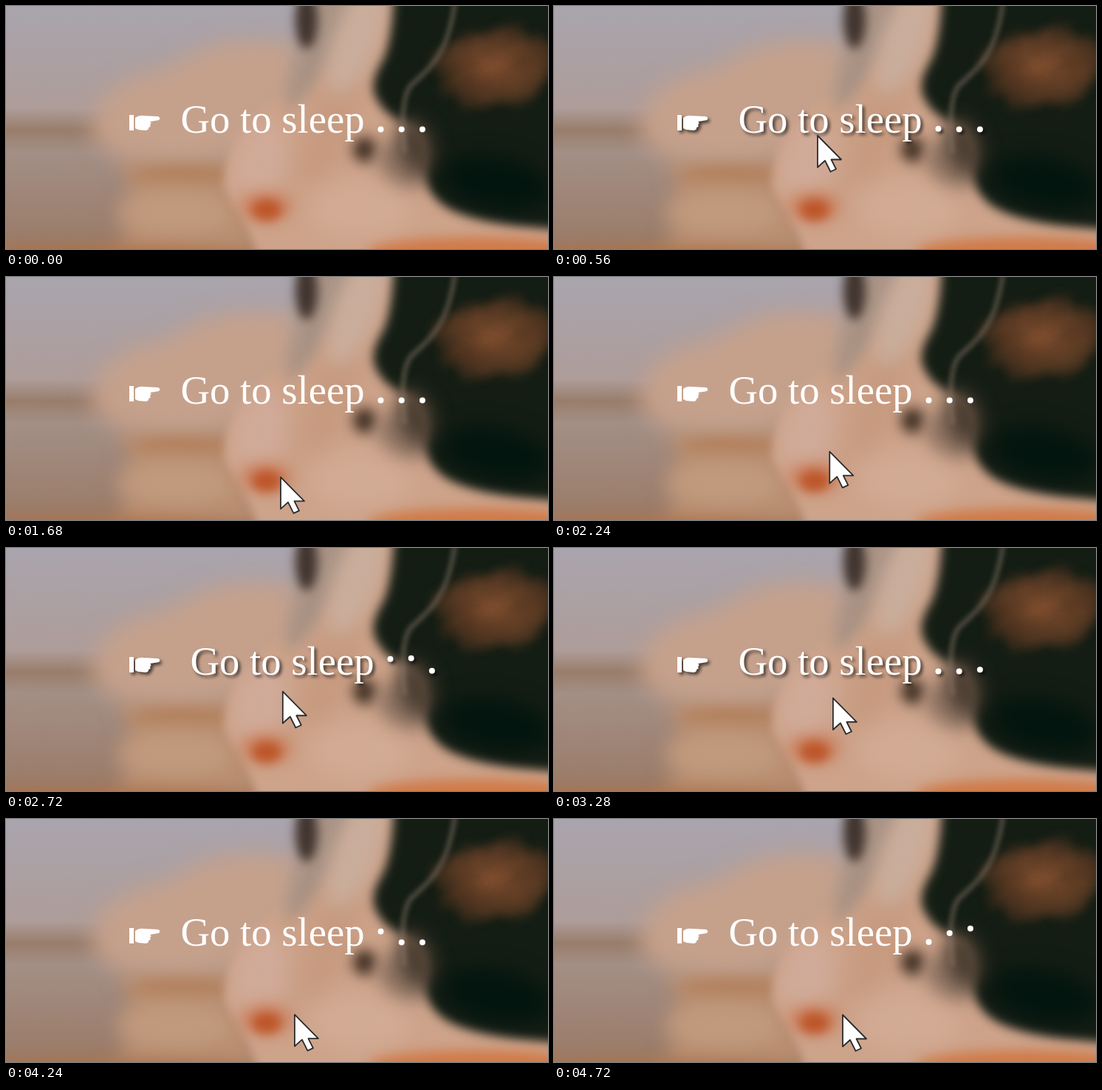
Write an HTML page with a canvas that moves like this. It is 734 px wide and 330 px high and loops after 4.8 s.

```html
<!DOCTYPE html>
<html lang="en">
<head>
<meta charset="utf-8">
<title>Go to sleep</title>
<style>
  html, body { margin: 0; width: 100%; height: 100%; overflow: hidden; background: #a99b9b; }
  canvas { display: block; }
</style>
</head>
<body>
<canvas id="stage" width="734" height="330"></canvas>
<script>
const W = 734, H = 330, LOOP = 4800, STEP = 80;
const ctx = document.getElementById('stage').getContext('2d');
const backdrop = document.createElement('canvas');
backdrop.width = W;
backdrop.height = H;
const bg = backdrop.getContext('2d');

const clamp = v => Math.max(0, Math.min(1, v));
const mix = (a, b, k) => a + (b - a) * k;
const smooth = k => k * k * (3 - 2 * k);

let seed = 7;
const random = () => (seed = seed * 16807 % 2147483647) / 2147483647;

function soft(color, blur, path) {
  bg.filter = `blur(${blur}px)`;
  bg.fillStyle = color;
  bg.fill(new Path2D(path));
}

function oval(color, blur, x, y, rx, ry, turn = 0) {
  bg.filter = `blur(${blur}px)`;
  bg.fillStyle = color;
  bg.beginPath();
  bg.ellipse(x, y, rx, ry, turn, 0, Math.PI * 2);
  bg.fill();
}

// Soft tufts scattered inside an ellipse, strongest near its centre.
function fur(count, hue, light, x, y, rx, ry) {
  for (let i = 0; i < count; i++) {
    const angle = i * 2.4, reach = Math.sqrt(i / count);
    const l = light * (1 - 0.45 * reach) + 6 * random();
    oval(`hsla(${hue}, 45%, ${l}%, 0.5)`, 7,
      x + rx * reach * Math.cos(angle), y + ry * reach * Math.sin(angle),
      rx * 0.35, ry * 0.3, -0.4);
  }
}

function paintBackdrop() {
  const wall = bg.createLinearGradient(0, 0, 0, H);
  wall.addColorStop(0, '#a9a4ad');
  wall.addColorStop(0.42, '#ae9d9a');
  wall.addColorStop(0.51, '#997d6b');
  wall.addColorStop(0.6, '#a38f86');
  wall.addColorStop(1, '#9a7a66');
  bg.fillStyle = wall;
  bg.fillRect(0, 0, W, H);

  // paws and blanket
  soft('#b98f72', 14, 'M140 350Q190 270 150 205H340V350Z');
  soft('#c5a18c', 15, 'M115 165Q125 100 220 85Q290 30 400 55V170Q290 225 190 210Q120 205 115 165');
  oval('#b27e58', 10, 240, 228, 70, 10);
  oval('#c19a7e', 14, 230, 280, 80, 28);
  oval('#ab744f', 10, 130, 340, 230, 14);

  // face
  soft('#cda38a', 6, 'M385 110Q420 40 430 -30H560L760 260V360H345Q335 305 297 250Q290 180 385 110');
  soft('#a89284', 10, 'M375 140Q395 40 425 -20H480Q445 80 400 130Z');
  oval('#d0aa98', 12, 345, 210, 36, 55, 0.3);
  oval('#c69a7f', 16, 440, 165, 30, 90, 0.35);
  oval('#d2ab94', 16, 480, 275, 70, 40);
  oval('#c9ad9c', 12, 475, 40, 28, 85, 0.35);
  oval('#41342e', 7, 407, 18, 15, 40);

  // dark coat
  oval('#3c2c20', 9, 486, 195, 16, 17);
  oval('#8d7362', 12, 540, 215, 40, 28, 0.5);
  soft('#141d14', 7, `M526 -40Q525 50 508 78Q490 108 503 128Q515 150 542 160
    Q570 170 568 215Q565 250 592 270Q620 290 700 299L790 308V-40Z`);
  oval('#4a3d31', 12, 555, 190, 24, 40, -0.3);
  oval('#03150f', 14, 665, 240, 75, 36, 0.2);
  fur(28, 23, 40, 664, 82, 72, 46);
  oval('#d07a48', 8, 640, 334, 150, 20);

  // nose
  oval('#cb8260', 10, 352, 272, 36, 20);
  oval('#bd5529', 7, 353, 277, 20, 14);

  // whisker
  bg.filter = 'blur(3px)';
  bg.strokeStyle = '#8d7b6e88';
  bg.lineWidth = 6;
  bg.stroke(new Path2D('M608 -5C598 70 572 85 548 108Q532 130 540 200'));
  bg.filter = 'none';
}

// cubic-bezier(.25, .1, .25, 1)
function ease(x) {
  if (x <= 0 || x >= 1) return clamp(x);
  let lo = 0, hi = 1, s;
  for (let i = 0; i < 20; i++) {
    s = (lo + hi) / 2;
    if (0.75 * s * (1 - s) + s ** 3 < x) lo = s; else hi = s;
  }
  return 0.3 * s * (1 - s) ** 2 + 3 * s * s * (1 - s) + s ** 3;
}

const ramp = (t, start) => ease((t - start) / 240);
const visit = (t, enter, leave) => ramp(t, enter) - ramp(t, leave);
const hoverAt = t => visit(t, 300, 1240) + visit(t, 2400, 3800);

const WAVE = { start: 540, period: 1770, rise: 360, gap: 195, height: 20 };
function lift(t, index) {
  const sinceStart = t - WAVE.start - index * WAVE.gap;
  const u = (sinceStart + 2 * WAVE.period) % WAVE.period / WAVE.rise;
  return WAVE.height * (u < 1 ? ease(u) : 1 - ease(u - 1));
}

// The pointer comes in from below, then glides between a few stops.
const STOPS = [
  { t: 80, x: 352, y: 340 }, { t: 560, x: 357, y: 176 }, { t: 1700, x: 372, y: 272 },
  { t: 2900, x: 375, y: 190 }, { t: 4300, x: 391, y: 266 }
];
function pointerAt(t) {
  const next = STOPS.findIndex(stop => stop.t > t);
  if (next === 0) return STOPS[0];
  if (next < 0) return STOPS[STOPS.length - 1];
  const a = STOPS[next - 1], b = STOPS[next];
  const k = smooth((t - a.t) / (b.t - a.t));
  return { x: mix(a.x, b.x, k), y: mix(a.y, b.y, k) };
}

const HAND = new Path2D(`M167 148h6v21h-6z
  M175 152Q180 148 187 149L206 150Q210 152 207 155L195 157
  Q198 159 195 161Q197 164 193 165Q194 168 189 169L179 168L175 166Z`);
const ARROW = new Path2D('M0 0V43L10 34L17.5 49L25 45.5L18.5 32.5H32Z');

function drawLabel(t) {
  const hover = hoverAt(t), shift = 13 * hover;
  ctx.save();
  ctx.filter = 'blur(0.6px)';
  ctx.fillStyle = '#fff';
  ctx.shadowColor = `rgba(0, 0, 0, ${0.65 * hover})`;
  ctx.shadowBlur = 4;
  ctx.shadowOffsetX = ctx.shadowOffsetY = 3 * hover;
  ctx.fill(HAND);
  ctx.font = '54.7px "Liberation Serif", "Times New Roman", serif';
  ctx.fillText('Go to sleep', 236.6 + shift, 172.3);
  for (let i = 0; i < 3; i++) {
    ctx.beginPath();
    ctx.arc(507.5 + 28.2 * i + shift, 167.5 - lift(t, i), 4, 0, Math.PI * 2);
    ctx.fill();
  }
  ctx.restore();
}

function drawPointer(t) {
  const { x, y } = pointerAt(t);
  ctx.save();
  ctx.translate(x, y);
  ctx.lineJoin = 'round';
  ctx.lineWidth = 1.8;
  ctx.fillStyle = '#fff';
  ctx.strokeStyle = '#2b2b2b';
  ctx.fill(ARROW);
  ctx.stroke(ARROW);
  ctx.restore();
}

function frame() {
  const t = Math.floor(performance.now() % LOOP / STEP) * STEP;
  ctx.drawImage(backdrop, 0, 0);
  drawLabel(t);
  drawPointer(t);
  requestAnimationFrame(frame);
}

paintBackdrop();
frame();
</script>
</body>
</html>
```
